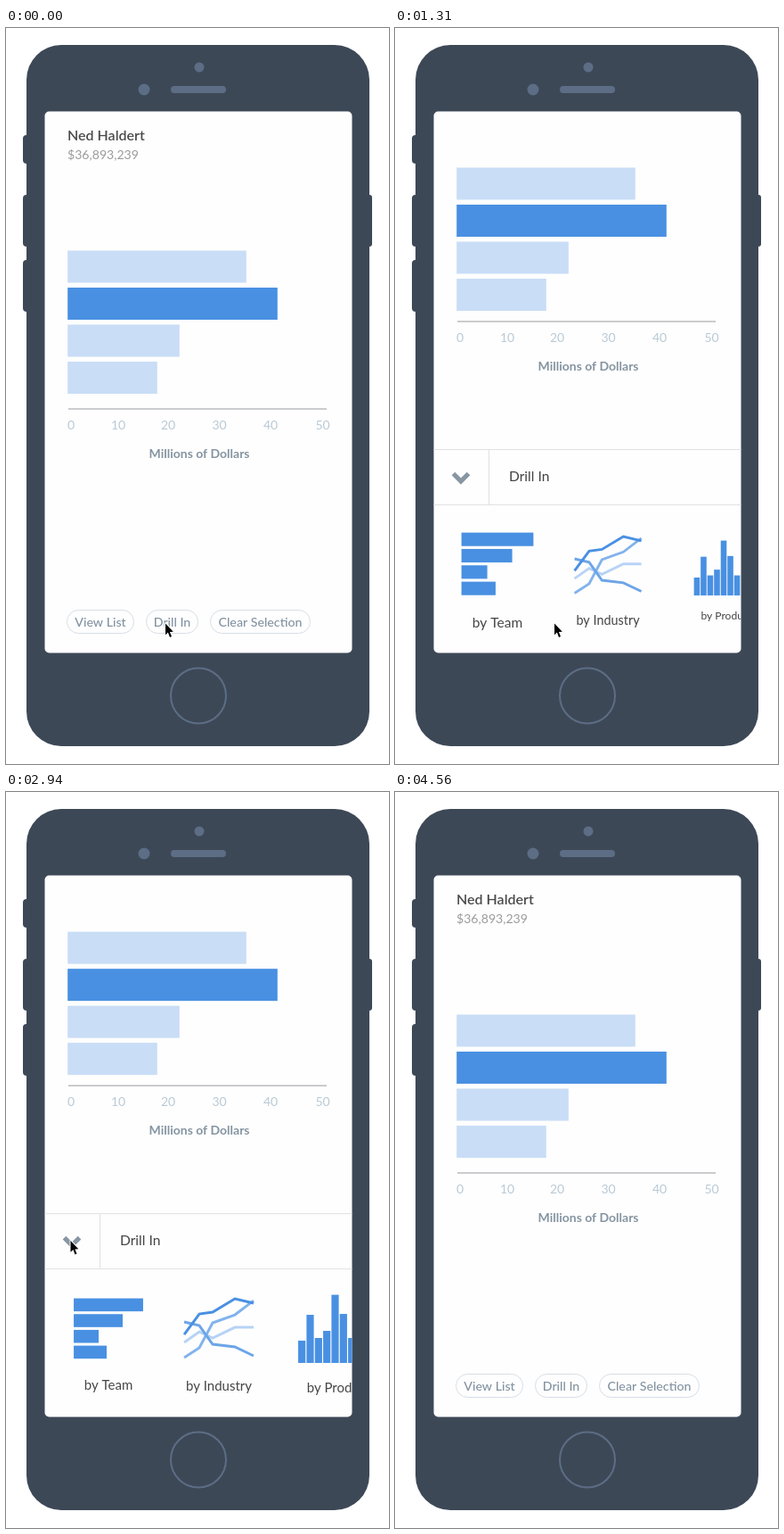
These frames come from a looping animation (430 by 825 pixels, 5.1 s). An HTML page with a canvas:

```html
<!DOCTYPE html>
<html lang="en">
<head>
<meta charset="utf-8">
<title>Drill in</title>
<style>
  html, body { margin: 0; width: 100%; height: 100%; overflow: hidden; background: #fff; }
  canvas { display: block; width: 430px; height: 825px; }
</style>
</head>
<body>
<canvas id="stage"></canvas>
<script>
const W = 430, H = 825, LOOP = 5100;
const canvas = document.getElementById('stage');
const ctx = canvas.getContext('2d');
const ratio = window.devicePixelRatio || 1;
canvas.width = W * ratio;
canvas.height = H * ratio;

const BODY = '#3d4857', TRIM = '#5c6d85', BLUE = '#4990e2', PALE = '#c9ddf6';
const TAP = 570, STEP = 147.4;                  // first change, then a steady low frame rate
const OPEN = 360, CLOSE = 2915, SLIDE = 610;    // panel slide
const POP = 985, STAGGER = 75;                  // icons
const GO = 1469, LAG = 80, TRAVEL = 1053;       // pointer trip to the chevron

const clamp = v => Math.min(1, Math.max(0, v));
const span = (t, start, length) => clamp((t - start) / length);
const smooth = u => u * u * (3 - 2 * u);
const cubicOut = u => 1 - (1 - u) ** 3;
const backOut = u => 1 + 2.2 * (u - 1) ** 3 + 1.2 * (u - 1) ** 2;
const mix = (a, b, u) => a + (b - a) * u;
const pulse = (t, from, to) => span(t, from, 90) * (1 - span(t, to - 250, 250));

// Times just before a step still count as that step.
function hold(t) {
  const k = Math.floor((t - TAP + 8) / STEP);
  return k < 0 ? 0 : TAP + k * STEP;
}

function rect(x, y, w, h, color) {
  ctx.fillStyle = color;
  ctx.fillRect(x, y, w, h);
}

function pill(x, y, w, h, r) {
  ctx.beginPath();
  ctx.roundRect(x, y, w, h, r);
}

function solid(x, y, w, h, r, color) {
  pill(x, y, w, h, r);
  ctx.fillStyle = color;
  ctx.fill();
}

function line(points, color, width) {
  ctx.beginPath();
  points.forEach(([x, y]) => ctx.lineTo(x, y));
  ctx.strokeStyle = color;
  ctx.lineWidth = width;
  ctx.stroke();
}

function ring(x, y, r, color, width, from = 0, to = Math.PI * 2) {
  ctx.beginPath();
  ctx.arc(x, y, r, from, to);
  ctx.strokeStyle = color;
  ctx.lineWidth = width;
  ctx.stroke();
}

function text(str, x, y, size, color, weight = 400, align = 'center') {
  ctx.font = `${weight} ${size}px Lato, "Open Sans", sans-serif`;
  ctx.textAlign = align;
  ctx.fillStyle = color;
  ctx.fillText(str, x, y);
}

function layer(alpha, dy, draw) {
  if (alpha <= 0) return;
  ctx.save();
  ctx.globalAlpha = alpha;
  ctx.translate(0, dy);
  draw();
  ctx.restore();
}

function drawPhone() {
  solid(19, 120, 10, 32, 4, BODY);
  solid(19, 187, 10, 58, 4, BODY);
  solid(19, 260, 10, 58, 4, BODY);
  solid(401, 187, 10, 58, 3, BODY);
  solid(23, 19, 385, 786, 39, BODY);
  solid(211.5, 38.5, 11, 11, 5.5, TRIM);
  solid(148.5, 62.5, 13, 13, 6.5, TRIM);
  solid(185, 65, 62, 8, 4, TRIM);
  ring(216, 748.5, 31, TRIM, 2);
  solid(43.5, 93.5, 345, 607, 5, '#fefefe');
}

function drawHeader() {
  text('Ned Haldert', 69, 125.5, 16, '#4a4a4a', 600, 'left');
  text('$36,893,239', 69, 146.5, 14.1, '#9b9b9b', 400, 'left');
}

function drawButton(label, x, w) {
  pill(x, 652.5, w, 26, 13);
  ctx.strokeStyle = '#d6dee6';
  ctx.lineWidth = 1;
  ctx.stroke();
  text(label, x + w / 2, 670.5, 14.2, '#8292a0', 500);
}

function drawButtons() {
  drawButton('View List', 68.5, 75);
  drawButton('Drill In', 157.5, 58);
  drawButton('Clear Selection', 229.5, 112);
}

function drawChart(lift) {
  [201, 236, 126, 101].forEach((w, i) =>
    rect(69.2, 249.5 + 41.5 * i - 93 * lift, w - .4, 36, i === 1 ? BLUE : PALE));
  const drop = -98 * lift;
  line([[70, 427 + drop], [360, 427 + drop]], '#96999e', 1);
  [73, 126, 182, 239.5, 297, 355.5].forEach((x, i) =>
    text(String(i * 10), x, 449.5 + drop, 14, '#b9c9d5'));
  text('Millions of Dollars', 217, 482 + drop, 14, '#8494a1', 700);
}

function drawPanel() {
  const rule = '#e0e1e2';
  line([[43, 472.5], [389, 472.5]], rule, 1);
  line([[43, 534.5], [389, 534.5]], rule, 1);
  line([[105.5, 473], [105.5, 534]], rule, 1);
  line([[65.5, 499.5], [74, 508], [82.5, 499.5]], '#8796a3', 5.2);
  text('Drill In', 128, 508, 15.6, '#444', 400, 'left');
}

function drawTeam() {
  [78, 55, 28, 37].forEach((w, i) => rect(76, 567.5 + 17.7 * i, w, 14.6, BLUE));
  text('by Team', 115, 670, 15, '#444');
}

function drawIndustry() {
  const xs = [200, 217, 232, 257, 278];
  const curve = (ys, color) => line(ys.map((y, i) => [xs[i], y]), color, 3);
  curve([617, 605, 612, 600, 600], '#b7d3f5');
  curve([634, 623, 595, 586, 570], '#82b3ed');
  curve([594, 598, 619, 622, 632], '#6ca5e8');
  curve([608, 585, 583, 568, 573], BLUE);
  text('by Industry', 239, 671, 15, '#444');
}

function drawProduct() {
  [25, 54, 28, 36, 76.5, 55, 28].forEach((h, i) => rect(328 + 9.35 * i, 640 - h, 8.2, h, BLUE));
  text('by Product', 373.5, 673, 15, '#444');
}

function drawIcons(t, lift) {
  [drawTeam, drawIndustry, drawProduct].forEach((icon, i) => {
    const scale = lift * backOut(span(t, POP + STAGGER * i, SLIDE));
    if (scale <= 0) return;
    const x = 115 + 126 * i, y = 620;
    ctx.save();
    ctx.translate(x, y);
    ctx.scale(scale, scale);
    ctx.translate(-x, -y);
    icon();
    ctx.restore();
  });
}

function drawTouch(x, y) {
  ctx.beginPath();
  ctx.arc(x, y, 33, 0, Math.PI * 2);
  ctx.fillStyle = 'rgba(255,255,255,.7)';
  ctx.fill();
  ring(x, y, 33, 'rgba(0,0,0,.1)', 1);
  ring(x, y + .5, 33, 'rgba(0,0,0,.15)', 1.2, .1, Math.PI - .1);
}

function drawCursor(x, y) {
  ctx.save();
  ctx.translate(x, y);
  ctx.beginPath();
  [[0, 0], [0, 12.8], [2.9, 10.1], [5, 15.4], [7, 14.5], [4.9, 9.4], [8.8, 9.2]]
    .forEach(([px, py]) => ctx.lineTo(px, py));
  ctx.closePath();
  ctx.lineJoin = 'round';
  ctx.strokeStyle = '#fff';
  ctx.lineWidth = 2;
  ctx.stroke();
  ctx.fillStyle = '#000';
  ctx.fill();
  ctx.restore();
}

function draw(t) {
  const lift = smooth(span(t, OPEN, SLIDE)) - smooth(span(t, CLOSE, SLIDE));
  const info = clamp(1 - (lift / .6) ** 1.5);
  const panel = lift ** 3;
  const move = cubicOut(span(t, GO, TRAVEL));
  const trail = cubicOut(span(t, GO + LAG, TRAVEL));
  const touch = pulse(t, 470, 880) + pulse(t, 1510, 2925);

  ctx.setTransform(ratio, 0, 0, ratio, 0, 0);
  rect(0, 0, W, H, '#fff');
  drawPhone();

  ctx.save();
  pill(43.5, 93.5, 345, 607, 5);
  ctx.clip();
  layer(info, -22 * lift, drawHeader);
  layer(info, 17 * lift, drawButtons);
  drawChart(lift);
  layer(panel, 94 * (1 - lift), drawPanel);
  layer(panel, 0, () => drawIcons(t, lift));
  layer(touch, 0, () => drawTouch(mix(179, 70.5, trail), mix(668, 505, trail)));
  if (t < 3500) drawCursor(mix(179, 72.5, move), mix(667.5, 503, move));
  ctx.restore();
}

let start = null;
function tick(now) {
  if (start === null) start = now;
  draw(hold((now - start) % LOOP));
  requestAnimationFrame(tick);
}
draw(0);
requestAnimationFrame(tick);
</script>
</body>
</html>
```
